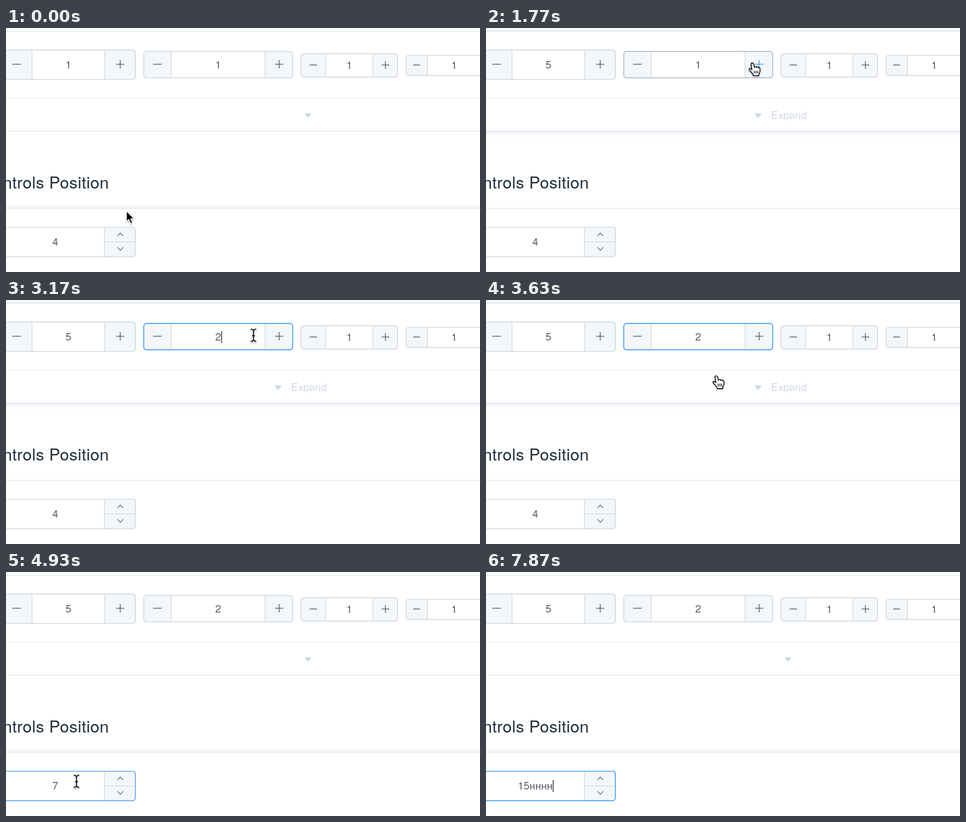
An HTML page that plays this animation: 948 by 488 pixels, repeating every 8000 ms.

```html
<!DOCTYPE html>
<html lang="en">
<head>
<meta charset="utf-8">
<title>Number inputs</title>
<style>
  html, body { margin: 0; width: 100%; height: 100%; overflow: hidden; background: #fff; }
  #stage { position: relative; width: 948px; height: 488px; overflow: hidden; background: #fff; }
  .card {
    position: absolute; left: -60px; width: 1068px; height: 200px; opacity: 0;
    box-shadow: 0 0 12px rgba(220, 226, 240, .7), 0 3px 6px rgba(216, 222, 236, .5);
  }
  svg { position: absolute; left: 0; top: 0; }
  text { font-family: "Helvetica Neue", Helvetica, "Liberation Sans", Arial, sans-serif; font-size: 21px; }
  .value { fill: #5a5e66; text-anchor: middle; }
  .title { font-size: 33px; fill: #1f2f3d; text-anchor: end; letter-spacing: .4px; }
</style>
</head>
<body>
<div id="stage">
  <div class="card" style="top:6px"></div>
  <div class="card" style="top:360px"></div>
  <svg id="svg" width="948" height="488" viewBox="0 0 948 488"></svg>
</div>
<script>
const LOOP = 8000, FADE = 200, SLIDE = 300;
const BASE = [208, 215, 226], HOVER = [176, 180, 189], BLUE = [52, 149, 250];
const ICON = '#5a5e66', ACTIVE = '#409eff', FILL = '#f4f7f9', LINE = '#d3d9e3';
const svg = document.getElementById('svg');

function add(tag, attrs, parent = svg) {
  const el = document.createElementNS('http://www.w3.org/2000/svg', tag);
  for (const k in attrs) el.setAttribute(k, attrs[k]);
  parent.appendChild(el);
  return el;
}
const stroke = (d, color, width = 1.5, parent = svg) =>
  add('path', { d, fill: 'none', stroke: color, 'stroke-width': width }, parent);

function write(x, y, text, attrs) {
  const el = add('text', { x, y, ...attrs });
  el.textContent = text;
  return el;
}

// ---- page ----
add('rect', { x: -5, y: 6.5, width: 960, height: 200, fill: '#fff' });
add('rect', { x: -5, y: 361, width: 960, height: 140, fill: '#fff' });
stroke('M0 6.5H948M0 206.2H948M0 360.8H948', '#e1e5ec');
stroke('M0 140.2H948', '#e8ecf4');
write(206, 321, 'Controls Position', { class: 'title' });
const triangle = add('path', { d: 'M597 171H611.5L604.2 180Z', fill: '#cdd6e3' });
const label = write(570, 181.5, 'Expand', { fill: '#d0d8e3' });
const cards = [...document.querySelectorAll('.card')].map((el, i) =>
  ({ el, y: [6.5, 361][i], log: [] }));

// ---- number fields ----
const fields = [];

function addField(x, y, w, h, left, right, cx, value, buttons) {
  const box = { x: x + .8, y: y + .8, width: w - 1.6, height: h - 1.6, rx: 5.5 };
  const base = Math.round(y + h / 2 + 7.3);
  add('rect', { ...box, fill: FILL });
  add('rect', { x: left, y: y + 1, width: right - left, height: h - 2, fill: '#fff' });
  stroke(`M${left} ${y}v${h}M${right} ${y}v${h}`, LINE);
  for (const b of buttons) b.el = stroke(b.icon, ICON, b.weight);
  const border = add('rect', { ...box, fill: 'none', 'stroke-width': 1.7 });
  const mark = add('rect', { x: cx - 5.8, y: base - 20, width: 11.7, height: 25, fill: '#b4d5fe' });
  const text = write(cx, base, value, { class: 'value' });
  const caret = add('rect', { y: base - 19, width: 1.6, height: 24, fill: '#333' });
  fields.push({ x, y, w, h, cx, buttons, border, mark, text, caret, value,
    values: [[0, value]], tones: [], focus: [[0, false]] });
}

// The inline fields stand side by side; height and button width shrink together.
let edge = -10;
[[269.5, 73.3], [299.5, 73.3], [194.5, 74.8], [194.5, 74.8]].forEach(([w, cy], i) => {
  const h = 60.5 - 6.1 * i, bw = h + 1.6, r = Math.min(8.5, h * .155);
  const x = edge, y = cy - h / 2, split = x + w - bw, iy = cy - .8;
  const bar = c => `M${c - r} ${iy}h${2 * r}`;
  const plus = split + bw / 2;
  addField(x, y, w, h, x + bw, split, x + w / 2, 1, [
    { x, y, w: bw, h, step: -1, weight: 1.6, icon: bar(x + bw / 2) },
    { x: split, y, w: bw, h, step: 1, weight: 1.6, icon: `${bar(plus)}M${plus} ${iy - r}v${2 * r}` }
  ]);
  edge += w + 15.2;
});

const half = { x: 197, w: 62.5, h: 30.2, weight: 1.3 };
stroke('M197 428.3H259', LINE);
addField(-60, 397.7, 319.5, 60.4, -58, 197, 98.5, 4, [
  { ...half, y: 397.7, step: 1, icon: 'M222.5 416l6-6l6 6' },
  { ...half, y: 428, step: -1, icon: 'M222.5 438.5l6 6l6-6' }
]);
stroke('M197 428.3H258.5', LINE);

// ---- pointer shapes, each with its hotspot at 0,0 ----
const pointer = add('g', { style: 'filter:drop-shadow(0 2px 1.5px rgba(0,0,0,.3))' });
const shapes = {
  arrow: add('path', { fill: '#000', stroke: '#fff', 'stroke-width': 1.5, 'stroke-linejoin': 'round',
    d: 'M0 0V21.2L4.7 16.8L8.2 25.2L12 23.6L8.4 15.4H15.2Z' }, pointer),
  hand: add('g', {}, pointer),
  beam: add('g', {}, pointer)
};
add('path', { fill: '#fff', stroke: '#000', 'stroke-width': 1.6, 'stroke-linejoin': 'round',
  d: 'M-3 2.5C-3-.8 1.6-1 2.4 2.2L4 9C4.3 6.5 8 6.6 8.2 9.2C8.8 7 12 7.4 12 9.8C13 8.5 15 9.2 15 11.5V16' +
     'C15 19 12.8 20 12.6 23V25.3H1.5V23.5C0 20-4 17-6.2 14C-7.8 11.5-5.5 9.8-3.5 11.6L-1 13.6Z' }, shapes.hand);
stroke('M3.6 15.5v5.5m3.4-5.5v5.5m3.4-5.5v5.5', '#000', 1.4, shapes.hand);
const serif = s => `M-5.5 ${s * 12.3}Q-1.5 ${s * 12.3} 0 ${s * 9.3}Q1.5 ${s * 12.3} 5.5 ${s * 12.3}`;
const beam = `${serif(-1)}${serif(1)}M0-9.5V9.5M-3 1H3`;
stroke(beam, '#fff', 3.6, shapes.beam);
stroke(beam, '#111', 2, shapes.beam);

// ---- what the user does: moves [from, to, x, y], bursts of clicks and keys ----
const moves = [
  [70, 600, 220, 75], [1470, 1760, 533, 70], [2190, 2440, 281, 72], [2600, 2880, 495, 70.5],
  [3200, 3600, 470, 140], [3600, 3860, 236, 440], [3860, 3990, 221, 412],
  [4800, 4930, 141, 418.5], [4980, 5370, 90, 426.5]
];
const burst = (start, count, gap) => Array.from({ length: count }, (_, i) => start + i * gap);
const clicks = [[900, 4], [1970, 2], [2560, 1], [2900, 1], [4110, 3], [4960, 1]]
  .flatMap(([t, n]) => burst(t, n, 165));
const keys = [...burst(6570, 2, 146), ...burst(7430, 4, 146)];
const typed = '15нннн';

const clamp = p => Math.max(0, Math.min(1, p));
const smooth = p => p * p * (3 - 2 * p);
const cubic = p => p < .5 ? 4 * p ** 3 : 1 - 4 * (1 - p) ** 3;
const within = (x, y, b) => x >= b.x && x <= b.x + b.w && y >= b.y && y <= b.y + b.h;
const last = (log, t) => log.filter(e => e[0] <= t).pop();

function position(t) {
  let x = 241, y = 366;
  for (const [from, to, tx, ty] of moves) {
    const p = smooth(clamp((t - from) / (to - from)));
    x += (tx - x) * p;
    y += (ty - y) * p;
  }
  return [x, y];
}

// Play the session once, logging every change of state with its time.
function record(log, t, state) {
  const prev = log[log.length - 1];
  if (!prev || prev[1] !== state) log.push([t, state]);
}
for (let t = 0, active = null; t < LOOP; t++) {
  const [x, y] = position(t);
  const over = fields.find(f => within(x, y, f));
  const pressed = over && over.buttons.find(b => within(x, y, b));
  if (clicks.includes(t)) {
    if (active) active.focus.push([t, false]);
    active = pressed ? null : over;
    if (pressed) over.values.push([t, over.value += pressed.step]);
    else active.focus.push([t, true]);
  }
  const key = keys.indexOf(t);
  if (key >= 0) {
    active.values.push([t, typed.slice(0, key + 1)]);
    active.focus.push([t, true]);
  }
  for (const f of fields)
    record(f.tones, t, f === active || f === over && pressed ? BLUE : f === over ? HOVER : BASE);
  for (const c of cards) record(c.log, t, y > c.y && y < c.y + 200 ? 1 : 0);
}

// Eases through a log of targets from wherever each change found the value.
function settle(log, t, span) {
  let now = [log[0][1]].flat();
  log.forEach(([at, to], i) => {
    if (t < at) return;
    const end = Math.min(t, i + 1 < log.length ? log[i + 1][0] : t);
    const p = cubic(clamp((end - at) / span));
    now = now.map((v, k) => v + ([to].flat()[k] - v) * p);
  });
  return now;
}

function shapeAt(x, y, t) {
  if (t < 690) return 'arrow';
  const f = fields.find(f => within(x, y, f));
  if (f) return f.buttons.some(b => within(x, y, b)) ? 'hand' : 'beam';
  return y > 140 && y < 206 ? 'hand' : 'arrow';
}

function draw(t) {
  const [x, y] = position(t);
  const kind = shapeAt(x, y, t);
  pointer.setAttribute('transform', `translate(${x} ${y})`);
  pointer.setAttribute('opacity', t < keys[0] ? 1 : 0);
  for (const k in shapes) shapes[k].style.display = k === kind ? '' : 'none';

  for (const f of fields) {
    f.text.textContent = last(f.values, t)[1];
    f.border.setAttribute('stroke', `rgb(${settle(f.tones, t, FADE).map(Math.round)})`);
    for (const b of f.buttons) b.el.setAttribute('stroke', within(x, y, b) ? ACTIVE : ICON);
    const [since, focused] = last(f.focus, t);
    const selected = focused && t < keys[0] && x < f.cx;
    f.mark.setAttribute('opacity', selected ? 1 : 0);
    f.caret.setAttribute('opacity', focused && !selected && (t - since) % 1000 < 500 ? 1 : 0);
    f.caret.setAttribute('x', f.cx + f.text.getComputedTextLength() / 2 + .2);
  }

  for (const c of cards) c.el.style.opacity = settle(c.log, t, FADE)[0];
  const open = settle(cards[0].log, t, SLIDE)[0];
  triangle.setAttribute('transform', `translate(${-60 * open} 0)`);
  label.setAttribute('transform', `translate(${60 * (1 - open)} 0)`);
  label.setAttribute('opacity', open);
}

const begin = performance.now();
function tick() {
  draw((performance.now() - begin) % LOOP);
  requestAnimationFrame(tick);
}
tick();
</script>
</body>
</html>
```
